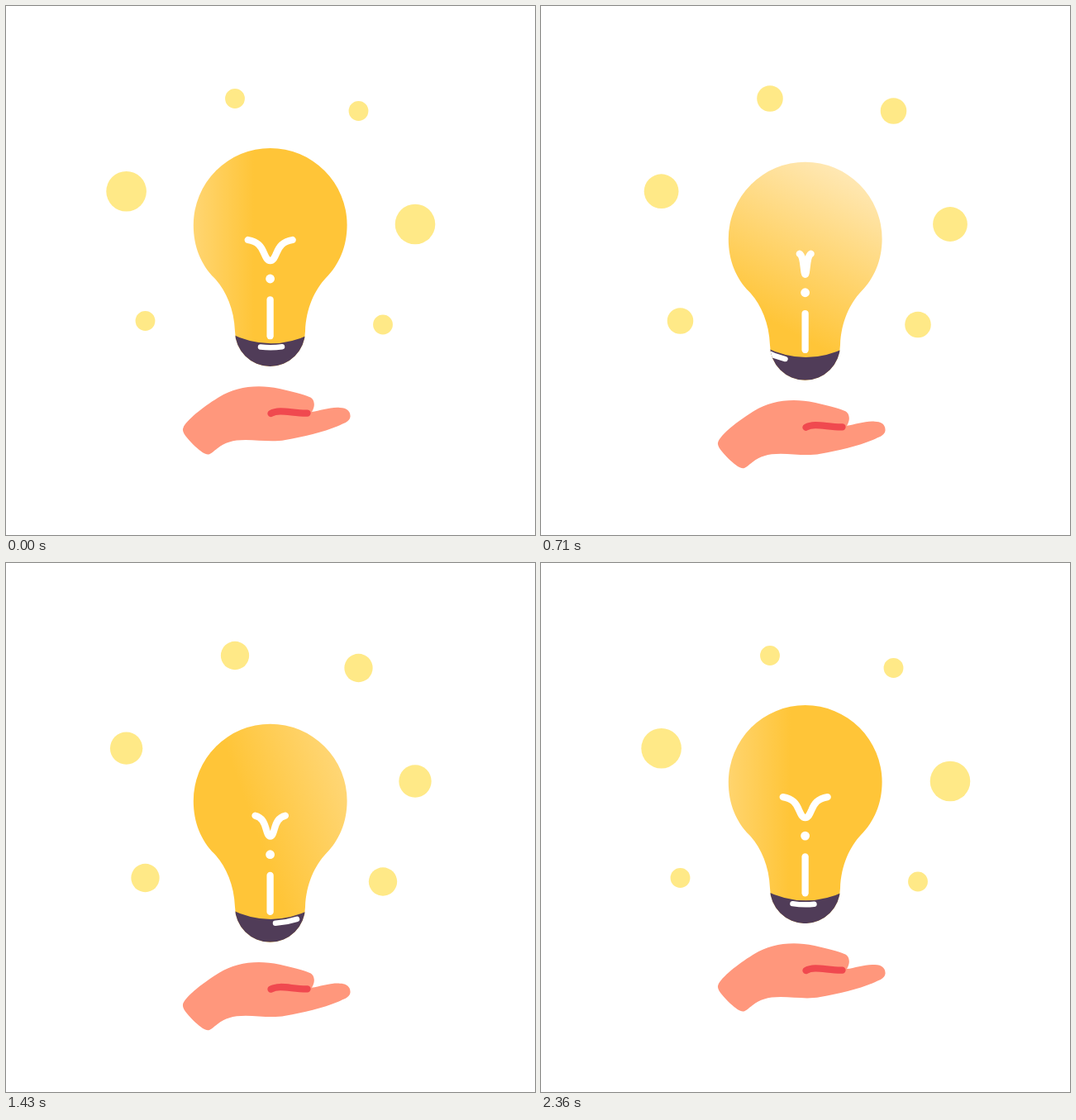
Recreate the animation shown at these times as an HTML page. Size 640x640 px, loop 2.43 s.

```html
<!DOCTYPE html>
<html lang="en">
<head>
<meta charset="utf-8">
<title>Bright idea</title>
<style>
  html, body { margin: 0; height: 100%; overflow: hidden; background: #fff; }
  svg { display: block; width: 100%; height: 100%; }
  .line { fill: none; stroke: #fff; stroke-width: 8.3; stroke-linecap: round; stroke-linejoin: round; }
</style>
</head>
<body>
<svg viewBox="0 0 640 640">
  <defs>
    <linearGradient id="glow" gradientUnits="userSpaceOnUse">
      <stop offset="0" stop-color="#ffebbf"/>
      <stop offset="1" stop-color="#ffc538"/>
    </linearGradient>
    <path id="bulb" d="M277 393.5 C276 365 265 343 252 329 C236 313 226.8 291 226.8 265
      A92.9 93 0 0 1 412.6 265 C412.6 291 403 313 387 329 C374 343 363 365 362 393.5 A42.5 42.5 0 0 1 277 393.5Z"/>
    <clipPath id="inside"><use href="#bulb"/></clipPath>
  </defs>
  <g id="dots" fill="#ffe987"></g>
  <g id="scene">
    <use href="#bulb" fill="url(#glow)"/>
    <g clip-path="url(#inside)">
      <path fill="#503c58" d="M270 395.6 Q319.5 420.6 369 396.4 V440 H270Z"/>
      <path id="shine" class="line" style="stroke-width:6.5"/>
    </g>
    <path id="filament" class="line"/>
    <circle cx="319.6" cy="330" r="5.4" fill="#fff"/>
    <path class="line" d="M319.6 355.3 V399.2"/>
    <path fill="#ff977c" d="M214 512 C214.5 504 238 485 258 473 C278 461 303 457 331 463 C345 466 360 470 367 473
      C373 475 375 483 370 491 C380 490 392 485 404 486 C413 486 417 491 416.5 497 C416 503 408 505 402 508
      C383 516 360 521 338 525 C322 528 306 525 290 525 C274 525 265 528 256 535 C252 538 248 542 245 542.5
      C241 543 236 539 229 533 C222 526 213 517 214 512Z"/>
    <path class="line" style="stroke:#f0494f" d="M320.5 493 C331 487 346 493 364.5 492.6"/>
  </g>
</svg>
<script>
const LOOP = 2430, FPS = 14, COUNT = 34, HALF = 16.5;
const $ = id => document.getElementById(id);
const ease = x => x * x * (3 - 2 * x);

const spot = big => ([x, y]) => {
  const el = document.createElementNS("http://www.w3.org/2000/svg", "circle");
  el.setAttribute("cx", x);
  el.setAttribute("cy", y);
  $("dots").append(el);
  return { el, big };
};
const dots = [
  ...[[277, 112], [426.5, 127], [168.5, 381], [456, 385.5]].map(spot(false)),
  ...[[145.6, 224.2], [495, 264]].map(spot(true))
];

// The light swings over the top of the bulb and back, weaker on the return
function glow(n, s) {
  const turn = Math.PI * (1 - s), up = Math.sin(turn);
  const rim = 0.43 + 0.35 * up + 0.18 * Math.sin(2 * Math.PI * n / COUNT);
  const deep = 20 - 145 * up;
  const bright = deep + (93 - deep) / rim;
  [bright, deep].forEach((r, i) => {
    $("glow").setAttribute("x" + (i + 1), 320 + r * Math.cos(turn));
    $("glow").setAttribute("y" + (i + 1), 265 - r * up);
  });
}

// The wire spins about its axis: only its width changes
function filament(n) {
  const phase = n % HALF / HALF * 2;
  const w = 27 - 22.7 * ease(phase < 1 ? phase : 2 - phase);
  const x = k => 319.7 + k * w;
  $("filament").setAttribute("d",
    `M${x(-1)} 283 C${x(-0.55)} 285 ${x(-0.4)} 291 ${x(-0.28)} 299
     C${x(-0.2)} 304 ${x(-0.14)} 308 ${x(0)} 308
     S${x(0.2)} 304 ${x(0.28)} 299 C${x(0.4)} 291 ${x(0.55)} 285 ${x(1)} 283`);
}

// A short parabola slides right across the cap and wraps
function shine(n) {
  const y = (a, b) => 413.3 - 0.005 * a * b;
  const c = (n * 5.65 + 49) % 95 - 48;
  $("shine").setAttribute("d", [c - 95, c, c + 95].map(u => {
    const a = u - 13, b = u + 13;
    return `M${320 + a} ${y(a, a)} Q${320 + u} ${y(a, b)} ${320 + b} ${y(b, b)}`;
  }).join(""));
}

function draw(now) {
  const n = Math.floor((now % LOOP + 5) * FPS / 1000) % COUNT;
  const s = ease(n < HALF ? n / HALF : Math.max(0, (33.5 - n) / 17));
  $("scene").setAttribute("transform", `translate(0 ${25.5 * s})`);
  for (const { el, big } of dots) el.setAttribute("r", big ? 24.3 - 5.2 * s : 11.9 + 5.9 * s);
  glow(n, s);
  filament(n);
  shine(n);
}

let start;
function tick(now) {
  start ??= now;
  draw(now - start);
  requestAnimationFrame(tick);
}
draw(0);
requestAnimationFrame(tick);
</script>
</body>
</html>
```
